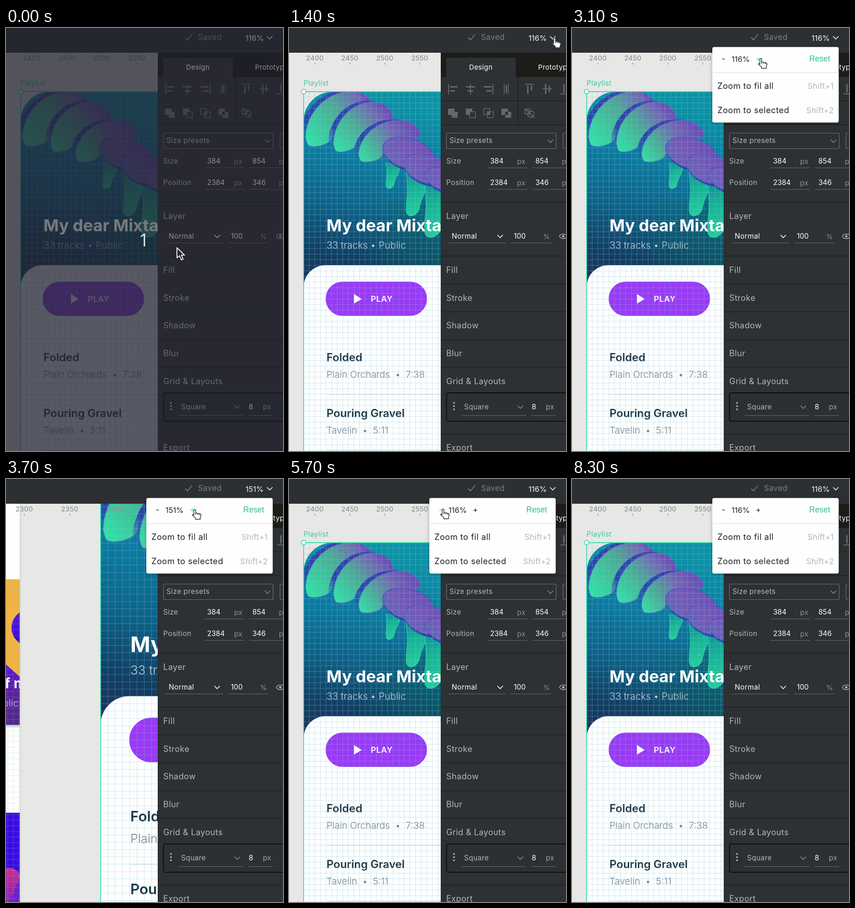
Animation of 606x924 px, one loop 9.2 s. Source, as an HTML page with a canvas:

```html
<!DOCTYPE html>
<html>
<head>
<meta charset="utf-8">
<style>
html, body { margin: 0; width: 100%; height: 100%; overflow: clip; background: #2e3134; }
canvas { display: block; }
</style>
</head>
<body>
<canvas id="stage" width="606" height="924"></canvas>
<script>
const c = document.getElementById('stage').getContext('2d');
const LOOP = 9200, PANEL = '#2e3134', ICON = '#64696c', LABEL = '#b4b7b9', GREEN = '#2fbf98';
const UNIT = 1.53; // pixels per design unit at 116%

function text(s, x, y, size, color, { weight = 400, gap = .025, align = 'left', font = 'Inter' } = {}) {
  c.font = `${weight} ${size}px "${font}", sans-serif`;
  c.letterSpacing = size * gap + 'px';
  c.textAlign = align;
  c.fillStyle = color;
  c.fillText(s, x, y);
}
function rect(x, y, w, h, color) {
  c.fillStyle = color;
  c.fillRect(x, y, w, h);
}
function box(x, y, w, h, r, fill, stroke, width = 1) {
  c.beginPath();
  c.roundRect(x, y, w, h, r);
  paint(fill, stroke, width);
}
function paint(fill, stroke, width) {
  if (fill) { c.fillStyle = fill; c.fill(); }
  if (stroke) { c.strokeStyle = stroke; c.lineWidth = width; c.stroke(); }
}
function line(color, width, ...p) {
  c.beginPath();
  for (let i = 0; i < p.length; i += 2) c.lineTo(p[i], p[i + 1]);
  paint(null, color, width);
}
function shape(d, x, y, fill, stroke, width) {
  c.save();
  c.translate(x, y);
  c.fillStyle = fill; c.strokeStyle = stroke; c.lineWidth = width; c.lineJoin = 'round';
  const p = new Path2D(d);
  c.fill(p);
  c.stroke(p);
  c.restore();
}
function gradient(x0, y0, x1, y1, ...stops) {
  const g = c.createLinearGradient(x0, y0, x1, y1);
  for (let i = 0; i < stops.length; i += 2) g.addColorStop(stops[i], stops[i + 1]);
  return g;
}
const chevron = (x, y, color, r = 6) => line(color, 1.6, x - r, y - r / 2, x, y + r / 2, x + r, y - r / 2);

// Cover artwork, in card coordinates
function shellPath(x, y, w, h) {
  const p = (...a) => a.map((v, i) => i % 2 ? y + v * h : x + v * w);
  c.beginPath();
  c.moveTo(...p(0, .85));
  c.bezierCurveTo(...p(0, .42, .28, 0, .65, 0));
  c.bezierCurveTo(...p(.85, 0, 1, .14, 1, .42));
  c.bezierCurveTo(...p(.8, .42, .45, .5, .38, .85));
  c.bezierCurveTo(...p(.36, .98, .08, 1.06, .03, .97));
  c.closePath();
}
function shell(x, y, w, h, mid) {
  shellPath(x - 11, y - 3, w, h);
  paint(gradient(x, y + h, x + w * .7, y, 0, 'rgba(40,80,170,0)', .3, '#2747aa', 1, '#3f3fae'));
  shellPath(x, y, w, h);
  paint(gradient(x, y + h, x + w * .85, y + h * .1,
    0, '#2ce8a6', mid, '#4cab95', mid + .35, '#7465b4', 1, '#6a4db4'), '#5b6cc0', 1.3);
}
function blob(x, y, w, h) {
  const at = (dx, dy) => {
    c.beginPath();
    c.ellipse(x + w / 2 + dx, y + h / 2 + dy, w / 2, h / 2, .3, 0, 7);
  };
  at(3, 6);
  paint('#2348a4');
  at(0, 0);
  paint(gradient(x, y + h, x + w, y, 0, '#5a6cba', .4, '#7559b6', 1, '#6b4bb6'), '#5546bd', 1.5);
}
function drip(x, y, w, h) {
  c.beginPath();
  c.moveTo(x, y);
  c.bezierCurveTo(x + w * .15, y + h * .5, x - w * .05, y + h * .7, x + w * .02, y + h * .92);
  c.bezierCurveTo(x + w * .1, y + h * 1.05, x + w * .45, y + h, x + w * .55, y + h * .85);
  c.bezierCurveTo(x + w * .65, y + h * .5, x + w, y + h * .4, x + w, y);
  paint(gradient(x, y, x + w * .6, y + h, 0, '#128f98', .4, '#16b394', 1, '#26cf9c'), '#2fdca6', 1);
}
function cover() {
  c.save();
  c.beginPath();
  c.roundRect(0, 0, 587, 440, [64, 0, 0, 0]);
  c.clip();
  rect(0, 0, 587, 440, gradient(0, 440, 90, 0,
    0, '#222f5a', .22, '#123f62', .45, '#0f6288', .7, '#0c7ba0', 1, '#0c93a4'));
  rect(0, 240, 587, 200, gradient(120, 0, 330, 0, 0, 'rgba(8,96,92,0)', 1, 'rgba(8,96,92,.6)'));
  drip(180, 155, 32, 57);
  drip(224, 175, 52, 97);
  drip(264, 200, 66, 119);
  shell(4, 0, 152, 119, .6);
  shell(65, 23, 132, 108, .5);
  shell(120, 63, 136, 90, .36);
  blob(171, 102, 117, 66);
  blob(218, 138, 108, 62);
  blob(265, 167, 92, 50);
  c.restore();
}
function track(y, title, artist) {
  text(title, 50, y, 24, '#1c3444', { weight: 600, gap: 0 });
  text(artist, 50, y + 36, 20.5, '#76818a', { weight: 300, gap: 0 });
  rect(50, y + 71.5, 537, 1, '#c6cdd4');
}
function grid(s, w, h) {
  const step = 8 * UNIT;
  c.beginPath();
  for (let x = step; x < w; x += step) { c.moveTo(x, 0); c.lineTo(x, h); }
  for (let y = step; y < h; y += step) { c.moveTo(0, y); c.lineTo(w, y); }
  paint(null, 'rgba(130,195,225,.38)', 1 / s);
}
const title = color => text('My dear Mixtape', 50, 305, 36, color, { weight: 700, gap: 0 });

function artboard(ox, oy, s) {
  c.save();
  c.translate(ox, oy);
  c.scale(s, s);
  cover();
  box(0, 379, 587, 930, [48, 0, 0, 0], '#fefefe');
  box(48, 415, 222, 75, 37.5, '#9a3af5');
  c.beginPath();
  c.moveTo(110, 442); c.lineTo(127, 453); c.lineTo(110, 463);
  paint('#fff');
  text('PLAY', 147, 459, 17.5, '#fff', { weight: 600, gap: .04 });
  track(589, 'Folded', 'Plain Orchards  •  7:38');
  track(711, 'Pouring Gravel', 'Tavelin  •  5:11');
  grid(s, 330, 800);
  title('#fff');
  text('33 tracks • Public', 50, 343, 21, '#b9ccd5', { weight: 300, gap: 0 });
  c.restore();
  line('#3fdbae', 1.8, ox + 600, oy, ox, oy, ox, 924);
  c.beginPath();
  c.arc(ox, oy, 5, 0, 7);
  paint('#fff', '#3fdbae', 1.8);
  text('Playlist', ox, oy - 13, 15.5, '#3ccba3');
}

// Neighbour visible only in the zoomed view
function neighbour() {
  c.save();
  c.shadowColor = 'rgba(0,0,0,.2)';
  c.shadowBlur = 5;
  rect(-100, 0, 130, 924, '#fefefe');
  c.restore();
  c.save();
  c.beginPath();
  c.rect(0, 54, 30, 870);
  c.clip();
  rect(0, 219, 30, 318, '#f3b341');
  c.beginPath();
  c.arc(52, 325, 40, 0, 7);
  paint(gradient(0, 285, 0, 365, 0, '#5a18d8', 1, '#3006d8'));
  c.beginPath();
  c.moveTo(0, 405); c.lineTo(30, 432); c.lineTo(30, 537); c.lineTo(0, 537);
  paint(gradient(0, 405, 0, 537, 0, '#5a16d6', .5, '#5a2298', 1, '#4e2a86'));
  rect(0, 537, 30, 8, gradient(0, 537, 0, 545, 0, 'rgba(0,0,0,.25)', 1, 'rgba(0,0,0,0)'));
  text('f m', -3, 457, 31, '#fff', { weight: 700, gap: 0 });
  text('Public', 28, 497, 22, '#c9b9dc', { weight: 300, gap: 0, align: 'right' });
  rect(0, 729, 30, 195, '#3a0be0');
  c.beginPath();
  c.moveTo(0, 850); c.quadraticCurveTo(18, 846, 30, 862); c.lineTo(30, 924); c.lineTo(0, 924);
  paint(gradient(0, 850, 0, 924, 0, '#c5308f', 1, '#8a25b4'));
  c.beginPath();
  c.moveTo(30, 872); c.lineTo(8, 924); c.lineTo(30, 924);
  paint('#6a1ed0');
  c.translate(30 - 20 * 16, 219);
  grid(1.3, 330, 705);
  c.restore();
}

function workspace(zoomed) {
  const s = zoomed ? 151 / 116 : 1, ox = zoomed ? 207 : 32, oy = zoomed ? -19 : 139;
  c.save();
  c.beginPath();
  c.rect(0, 54, 332, 870);
  c.clip();
  rect(0, 54, 332, 870, '#e7e8e6');
  if (zoomed) neighbour();
  artboard(ox, oy, s);
  for (let n = 2300; n <= 2600; n += 50) {
    const x = ox + (n - 2384) * UNIT * s;
    text(n, x, 71, 15, '#909496', { weight: 500, gap: 0, align: 'center' });
    rect(x - .5, 76, 1.5, 4, '#909496');
  }
  c.restore();
}

// Side panel
function alignIcons() {
  const bars = [
    [348, 122, 2, 23], [352, 127, 17, 3], [352, 136, 11, 3],
    [396, 122, 2, 23], [387, 127, 20, 3], [391, 136, 12, 3],
    [445, 122, 2, 23], [426, 127, 17, 3], [432, 136, 11, 3],
    [470, 122, 1.5, 23], [474, 125, 3, 17], [479, 122, 1.5, 23],
    [516, 122, 20, 2], [521, 126, 3, 18], [529, 126, 3, 11],
    [555, 132, 20, 2], [560, 122, 3, 22], [568, 126, 3, 14],
    [594, 143, 20, 2], [600, 123, 3, 18]];
  bars.forEach(b => rect(...b, ICON));
}
function shapeIcons() {
  for (let i = 0; i < 4; i++) {
    const x = 348 + i * 39, front = [x + 8, 183, 13, 13];
    if (i == 2) box(x, 176, 13, 13, 0, null, ICON, 1.6);
    else rect(x, 176, 14, 14, ICON);
    if (i == 1) box(...front, 0, PANEL, ICON, 1.6);
    else if (i == 2) box(...front, 0, null, ICON, 1.6);
    else rect(...front, ICON);
    if (i > 1) rect(x + 8, 183, 6, 7, i == 2 ? ICON : PANEL);
  }
  c.beginPath();
  c.arc(529, 188, 7, 0, 7);
  paint(null, ICON, 1.8);
  box(516, 177, 11, 11, 2, null, ICON, 1.8);
  line(ICON, 1.8, 517, 177, 537, 196);
}
function panel(zoom) {
  rect(332, 54, 274, 870, PANEL);
  rect(0, 0, 606, 54, '#2d3033');
  rect(332, 54, 274, 53, '#1c1c19');
  box(344, 65, 152, 50, 4, PANEL);
  rect(332, 107, 274, 20, PANEL);
  text('Design', 394, 91, 15, '#fff');
  text('Prototype', 545, 91, 15, '#fff');
  line('#797d80', 1.8, 392, 21, 397, 26, 407, 14);
  text('Saved', 420, 26, 17, '#7d8083');
  text(zoom, 524, 28, 16.5, '#f4f5f5', { gap: 0 });
  chevron(577, 21, '#f4f5f5');

  rect(332, 54, 1, 870, '#1f2224');
  for (const y of [159, 211, 380, 498, 559, 620, 681, 741, 887]) rect(332, y - .5, 274, 1.4, '#1d2022');
  rect(500, 107, 1.4, 104, '#1d2022');
  alignIcons();
  shapeIcons();

  box(344.5, 229.5, 240, 34, 3, null, '#707477', 1.2);
  box(599.5, 229.5, 60, 34, 3, null, '#707477', 1.2);
  text('Size presets', 351, 251, 15.5, LABEL);
  chevron(572, 247, '#85898b');
  [['Size', 296, 384, 854], ['Position', 343, 2384, 346]].forEach(([name, y, a, b]) => {
    text(name, 344, y, 15.5, LABEL);
    text(a, 440, y, 15.5, '#fff', { gap: 0 });
    text('px', 499, y + 1, 15.5, '#8d9193');
    text(b, 539, y, 15.5, '#fff', { gap: 0 });
    text('px', 597, y + 1, 15.5, '#8d9193');
    rect(434, y + 9, 87, 1, '#6a6e71');
    rect(532, y + 9, 74, 1, '#6a6e71');
  });
  [['Layer', 417], ['Fill', 535], ['Stroke', 596], ['Shadow', 656], ['Blur', 717],
    ['Grid & Layouts', 778], ['Export', 923]].forEach(([s, y]) => text(s, 344, y, 18, LABEL));

  text('Normal', 356, 460, 15.5, '#fff');
  chevron(462, 455, '#fff');
  text('100', 492, 460, 15.5, '#fff', { gap: 0 });
  text('%', 556, 461, 15, '#8d9193');
  rect(349, 469, 126, 1, '#6a6e71');
  rect(486, 469, 88, 1, '#6a6e71');
  c.beginPath();
  c.ellipse(600, 455, 8, 5, 0, 0, 7);
  paint(null, LABEL, 1.5);
  c.beginPath();
  c.arc(600, 455, 2.5, 0, 7);
  paint(LABEL);

  box(344.5, 797, 290, 62, 4, '#2d3033', '#0c0d0e', 2);
  for (const y of [819, 826, 833]) box(359, y - 2, 4, 4, 2, '#a5a9ab');
  text('Square', 383, 833, 15.5, LABEL);
  chevron(506, 828, '#85898b');
  text('8', 531, 833, 15.5, '#fff');
  text('px', 562, 833, 15.5, '#a0a4a6');
  rect(377, 846, 142, 1, '#6a6e71');
  rect(530, 846, 54, 1, '#6a6e71');
}

function menu(t, zoom, y) {
  c.save();
  c.shadowColor = 'rgba(0,0,0,.28)';
  c.shadowBlur = 8;
  c.shadowOffsetY = 2;
  box(307, 41.5, 276.5, 165, 4, '#fefefe');
  c.restore();
  if (t < 8200 && y > 151) box(307, 153.5, 276.5, 53, [0, 0, 4, 4], '#d2fcea');
  else if (t < 8200 && y > 98) rect(307, 101, 276.5, 52.5, '#d2fcea');
  rect(309, 97, 273, 1.2, '#dcdedd');
  const dark = '#1f2122', over = (a, b) => t >= a && t < b ? '#45d9ae' : dark;
  text('-', 327.5, 73, 17, over(5400, 6300), { gap: 0 });
  text(zoom, 349, 74, 16.5, dark, { gap: 0 });
  text('+', 402, 73, 17, over(3100, 4900), { gap: 0 });
  text('Reset', 519, 73, 17.5, GREEN, { gap: 0, font: 'Liberation Sans' });
  [['Zoom to fil all', 'Shift+1', 133], ['Zoom to selected', 'Shift+2', 186]].forEach(([s, key, y]) => {
    text(s, 318, y, 18.3, dark);
    text(key, 573, y, 17.2, '#b3b5b6', { align: 'right' });
  });
}

// Start, end, target x, target y, downward bow
const MOVES = [
  [300, 1100, 570, 26], [1200, 1400, 572, 20], [2000, 3000, 404, 65], [4800, 5400, 328, 64, 14],
  [6200, 6300, 328, 75], [6400, 6900, 349, 142], [7000, 7100, 348, 153], [7200, 7400, 352, 178],
  [7800, 7900, 476, 178], [8000, 8200, 564, 181]];
function cursorAt(t) {
  let x = 374, y = 480;
  for (const [a, b, tx, ty, bow = 0] of MOVES) {
    if (t <= a) break;
    const k = Math.min(1, (t - a) / (b - a)), e = k * k * (3 - 2 * k);
    x += (tx - x) * e;
    y += (ty - y) * e + bow * Math.sin(Math.PI * k);
  }
  return [x, y];
}
function cursor(t, x, y) {
  if (t >= 8300) return;
  if (t < 1400) shape('M0 0V22L5.500 17.500L9.500 26.500L13.500 24.800L9.700 16H16.500Z', x, y, '#25282b', '#fff', 1.8);
  else shape('M7 14V3.500a2 2 0 0 1 4 0V9l9 2q3 1 2.500 4l-1.500 4v4H10.500V20L4 14.500q-1-3 3-.5ZM11 9v4M15 10v3M19 11v3',
    x, y, '#fff', '#303234', 1.5);
}
function countdown() {
  rect(0, 54, 332, 870, 'rgba(32,34,47,.75)');
  rect(0, 0, 606, 54, 'rgba(30,32,45,.52)');
  rect(332, 54, 274, 870, 'rgba(33,34,48,.52)');
  c.save();
  c.beginPath();
  c.rect(0, 54, 332, 870);
  c.clip();
  c.translate(32, 139);
  title('#76787b');
  c.restore();
  text('1', 291, 477, 38, '#dff0f0', { gap: 0, font: 'Open Sans' });
}

function draw(now) {
  const t = Math.floor(now % LOOP / 100) * 100;
  const zoomed = t >= 3700 && t < 5700, zoom = zoomed ? '151%' : '116%';
  const [x, y] = cursorAt(t);
  workspace(zoomed);
  panel(zoom);
  if (t >= 1700) menu(t, zoom, y);
  if (t < 200) countdown();
  cursor(t, x, y);
}
const start = performance.now();
(function frame() {
  draw(performance.now() - start);
  requestAnimationFrame(frame);
})();
</script>
</body>
</html>
```
